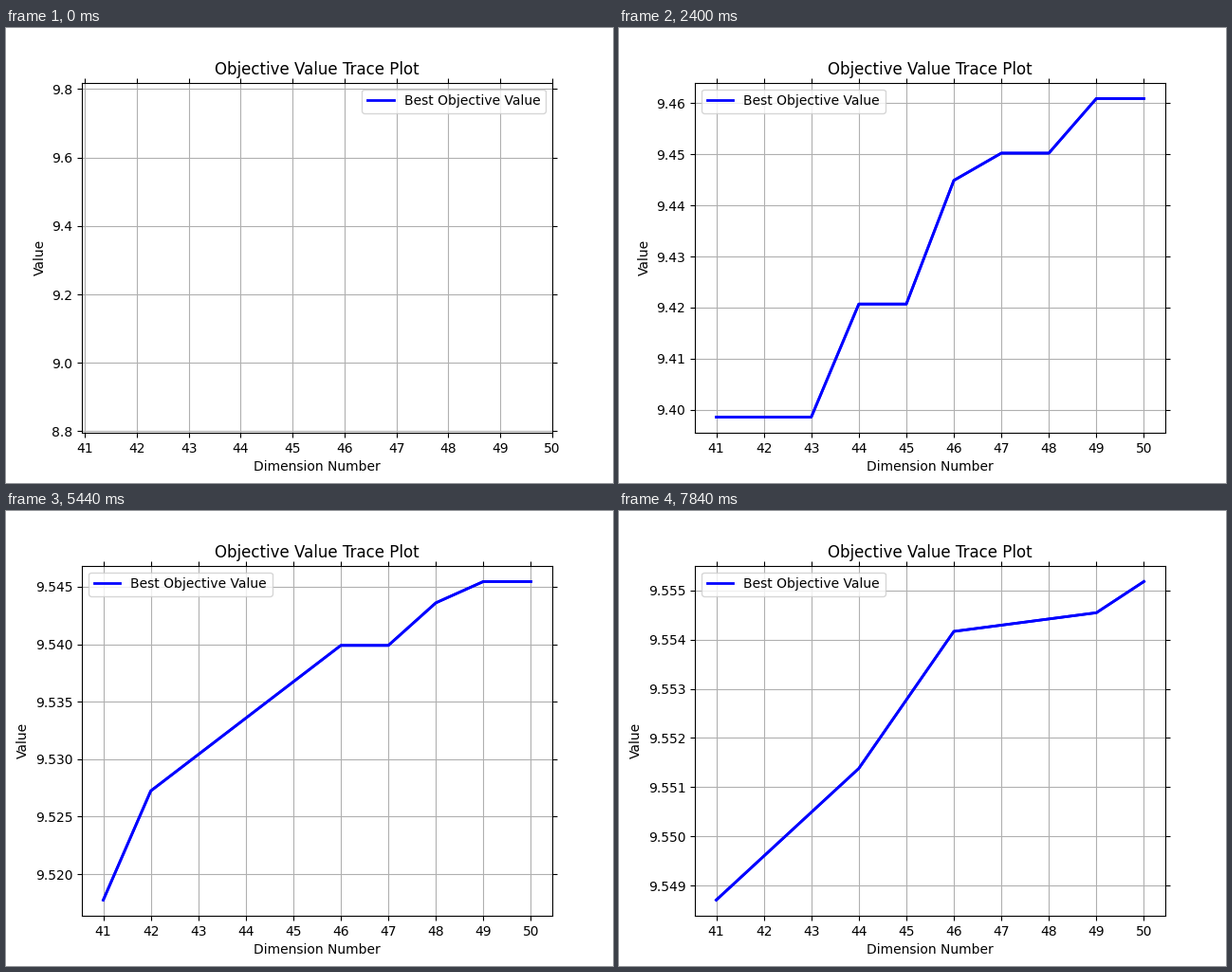
A matplotlib script that plays this animation: 640x480 px, repeating every 8000 ms.

```python
import matplotlib.pyplot as plt
import numpy as np
from matplotlib.animation import FuncAnimation

FRAMES = 50
INTERVAL = 160
WINDOW = 10

# Key points (step, value) of the rising trend.
TREND = [
    (0, 9.307), (1, 9.3649), (6, 9.3986), (9, 9.4207), (11, 9.44488), (14, 9.4609),
    (17, 9.4721), (18, 9.49673), (23, 9.51774), (30, 9.5399), (33, 9.54546),
    (39, 9.54732), (40, 9.548703), (43, 9.551381), (45, 9.55417), (48, 9.55455),
    (49, 9.555185),
]
# Steps without improvement: rests of two steps, then single ones.
LONG_RESTS = (2, 7, 19, 24)
SHORT_RESTS = (10, 13, 15, 31, 34, 36, 38)


def best_values():
    rests = {s + k for s in LONG_RESTS for k in (0, 1)}.union(SHORT_RESTS)
    values = np.interp(np.arange(FRAMES), *zip(*TREND))
    for step in sorted(rests):
        values[step] = values[step - 1]
    return values


plt.rcParams["font.family"] = "DejaVu Sans"
fig, ax = plt.subplots(figsize=(6.4, 4.8), dpi=100)
slots = np.arange(1, WINDOW + 1)
best = best_values()


def draw(step):
    ax.clear()
    recent = best[max(0, step - WINDOW + 1):step + 1]
    # The trace is laid down twice, which firms up its edges.
    for label in ("Best Objective Value", None):
        ax.plot(slots[:len(recent)], recent, color="blue", lw=2, label=label)
    # Fixed ticks also widen the x range while the window fills up.
    ax.set_xticks(slots, [str(40 + s) for s in slots])
    ax.tick_params(top=True, right=True)
    ax.set_title("Objective Value Trace Plot")
    ax.set_xlabel("Dimension Number")
    ax.set_ylabel("Value")
    ax.grid(True)
    ax.legend(loc="best")


anim = FuncAnimation(fig, draw, frames=FRAMES, interval=INTERVAL, repeat=True, repeat_delay=0)
plt.show()
```
